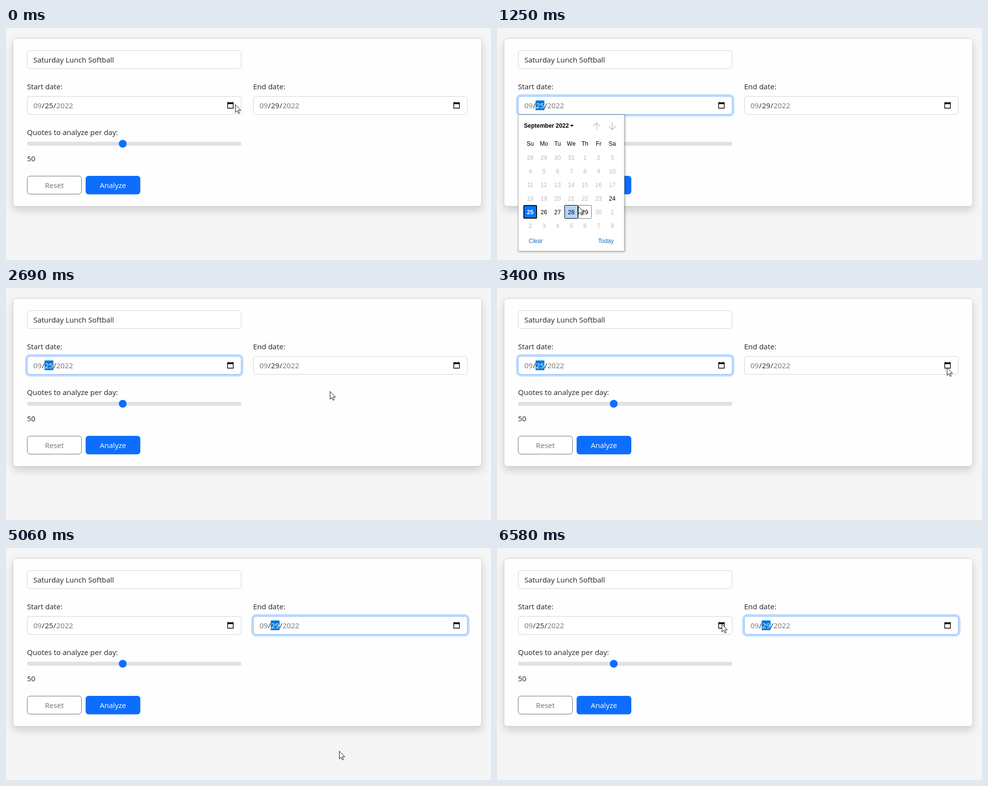
An HTML page that plays this animation: 993x477 px, repeating every 7.08 s.

```html
<!DOCTYPE html>
<html lang="en">
<head>
<meta charset="utf-8">
<title>Date form</title>
<style>
  html, body { margin: 0; width: 100%; height: 100%; overflow: hidden; background: #f5f5f5; }
  svg { display: block; font: 15px "Open Sans", "Noto Sans", sans-serif; fill: #212529; }
  .card { fill: #fefefe; stroke: #d0d0d1; filter: drop-shadow(0 8px 8px rgba(0, 0, 0, .15)); }
  .box { fill: #fff; stroke: #ced4da; }
  .ring { fill: #c2dbfe; }
  .focused { fill: #fff; stroke: #86b7fe; }
  .muted { fill: #757575; }
  .white { fill: #fff; }
  .mid { text-anchor: middle; }
  .popup { font: 12px "Liberation Sans", Arial, sans-serif; fill: #000; }
  .panel { fill: #fff; stroke: #b8b8b8; filter: drop-shadow(1px 1px 2px rgba(0, 0, 0, .35)); }
  .off { fill: #bababa; }
  .bold { font-weight: bold; }
  .link { fill: #0b72cc; }
  .arrow { fill: none; stroke: #b4b4b4; stroke-width: 1.2; }
</style>
</head>
<body>
<svg id="stage" width="993" height="477" viewBox="0 0 993 477"></svg>
<script>
const LOOP = 7080;
const START_OPEN = 110, START_PICK = 2090, END_OPEN = 3600, END_PICK = 4740;
const CELL = 28, FIRST_X = 11, FIRST_Y = 252;

// Pointer stops: time, x, y
const stops = [
  [0, 469, 157], [30, 469, 157], [250, 436, 176], [450, 310, 238], [710, 190, 292],
  [950, 101, 345], [1250, 165.6, 366], [1430, 211, 356], [1600, 160, 367],
  [1860, 64, 377], [2090, 64, 377], [2400, 340, 298], [2690, 662, 212],
  [2760, 703, 207], [3080, 985, 188], [3400, 921, 163], [3600, 921, 163],
  [3820, 909, 183], [4080, 785, 325], [4290, 691, 420], [4430, 669, 441],
  [4740, 669, 441], [5060, 682, 417], [5420, 683, 296], [5800, 570, 222],
  [6140, 476, 165], [6350, 460, 157], [6580, 460, 156], [LOOP, 460, 156]
];

const text = (x, y, s, cls = "") => `<text x="${x}" y="${y}" class="${cls}">${s}</text>`;
const rect = (x, y, w, h, r, attrs) =>
  `<rect x="${x}" y="${y}" width="${w}" height="${h}" rx="${r}" ${attrs}/>`;
const field = (x, y, cls = "box") => rect(x + .5, y + .5, 438, 37, 5.5, `class="${cls}"`);

function dateField(id, x, label, day) {
  return text(x, 126, label) + field(x, 140) +
    `<g id="${id}Focus">${rect(x - 4, 136, 447, 46, 10, 'class="ring"')}
      ${field(x, 140, "focused")}${rect(x + 36, 149, 18, 20, 0, 'fill="#0078d7"')}</g>` +
    text(x + 13, 165, "09", "muted") + text(x + 30.5, 165, "/") +
    `<text id="${id}Day" x="${x + 36.5}" y="165">${day}</text>` +
    text(x + 54, 165, "/") + text(x + 60, 165, "2022", "muted") +
    `<path d="M${x + 410.7} 154.7h11.6v10h-11.6z" fill="none" stroke="#000" stroke-width="1.4"/>
     <path d="M${x + 410} 153h13v3.5h-13zM${x + 412} 152h1.6v2h-1.6zM${x + 419.4} 152h1.6v2h-1.6z" fill="#000"/>`;
}

function popup(id, x, firstDay, picked) {
  let s = `<g id="${id}Popup" class="popup">` +
    rect(x + .5, 178.5, 217, 280, 0, 'class="panel"') +
    text(x + 12, 205, "September 2022", "bold") +
    `<path d="M${x + 106.5} 199h7.5l-3.75 4z"/>
     <path class="arrow" d="M${x + 161} 210v-15m-7 7l7-7l7 7M${x + 193} 194v15m-7-7l7 7l7-7"/>` +
    `<rect id="${id}Hover" width="27" height="27" rx="1" fill="#b2d5ff" stroke="#000"/>`;
  ["Su", "Mo", "Tu", "We", "Th", "Fr", "Sa"].forEach((d, i) => {
    s += text(x + 25 + CELL * i, 242, d, "mid");
  });
  for (let i = 0; i < 42; i++) {
    const n = i - 3; // the grid begins on August 28
    const day = n < 1 ? n + 31 : n > 30 ? n - 30 : n;
    const cx = x + FIRST_X + CELL * (i % 7), cy = FIRST_Y + CELL * Math.floor(i / 7);
    let cls = "mid";
    if (n === picked) {
      s += rect(cx + 1, cy + 1, 26, 26, 1, 'fill="#0a75ff" stroke="#101010" stroke-width="2"');
      cls += " bold white";
    } else if (n === 29) {
      s += rect(cx + .5, cy + .5, 27, 27, 1, 'fill="none" stroke="#767676"');
    }
    if (n < firstDay || n > 29) cls += " off";
    s += text(cx + 14, cy + 19, day, cls);
  }
  return s + text(x + 22, 442, "Clear", "link") + text(x + 164, 442, "Today", "link") + "</g>";
}

document.getElementById("stage").innerHTML =
  rect(14.5, 21.5, 959, 345, 6, 'class="card"') +
  field(43, 46) + text(56, 71, "Saturday Lunch Softball") +
  dateField("start", 43, "Start date:", 25) +
  dateField("end", 506, "End date:", 29) +
  text(43, 220, "Quotes to analyze per day:") +
  rect(43, 234, 439, 8, 4, 'fill="#dee2e6"') +
  '<circle cx="239" cy="238" r="8" fill="#0d6efd"/>' +
  text(43, 274, "50") +
  rect(43.5, 304.5, 111, 37, 5.5, 'fill="#fff" stroke="#6c757d"') +
  text(99, 329, "Reset", "mid muted") +
  rect(163, 304, 112, 38, 6, 'fill="#0d6efd"') +
  text(219, 329, "Analyze", "mid white") +
  popup("start", 43, 24, 25) + popup("end", 506, 25, 29) +
  `<path id="pointer" d="M.5.7v16l3.7-3.5l2.6 5.6l2.3-1l-2.5-5.5h5z"
    fill="#fff" stroke="#111" stroke-linejoin="round"/>`;

const get = id => document.getElementById(id);
const show = (id, on) => get(id).setAttribute("visibility", on ? "visible" : "hidden");

const slope = (i, k) => (stops[i + 1][k] - stops[i][k]) / (stops[i + 1][0] - stops[i][0]);

// Tangent that never overshoots a stop
function tangent(i, k) {
  if (i === 0 || i === stops.length - 1) return 0;
  const a = slope(i - 1, k), b = slope(i, k);
  return a * b <= 0 ? 0 : 2 * a * b / (a + b);
}

function pointerAt(t) {
  let i = 0;
  while (i < stops.length - 2 && t >= stops[i + 1][0]) i++;
  const d = stops[i + 1][0] - stops[i][0], u = (t - stops[i][0]) / d, v = 1 - u;
  return [1, 2].map(k =>
    v * v * (1 + 2 * u) * stops[i][k] + u * u * (3 - 2 * u) * stops[i + 1][k] +
    d * u * v * (v * tangent(i, k) - u * tangent(i + 1, k)));
}

function hover(id, left, firstDay, picked, open, x, y) {
  const col = Math.floor((x - left - FIRST_X) / CELL), row = Math.floor((y - FIRST_Y) / CELL);
  const n = row * 7 + col - 3;
  const on = open && col >= 0 && col < 7 && n >= firstDay && n <= 29 && n !== picked;
  show(id + "Hover", on);
  if (on) {
    get(id + "Hover").setAttribute("x", left + FIRST_X + col * CELL + .5);
    get(id + "Hover").setAttribute("y", FIRST_Y + row * CELL + .5);
  }
}

function focus(id, on) {
  show(id + "Focus", on);
  get(id + "Day").setAttribute("class", on ? "white" : "");
}

function draw(t) {
  const [x, y] = pointerAt(t);
  const startOpen = t >= START_OPEN && t < START_PICK;
  const endOpen = t >= END_OPEN && t < END_PICK;
  focus("start", t >= START_OPEN && t < END_OPEN);
  focus("end", t >= END_OPEN);
  show("startPopup", startOpen);
  show("endPopup", endOpen);
  hover("start", 43, 24, 25, startOpen, x, y);
  hover("end", 506, 25, 29, endOpen, x, y);
  get("pointer").setAttribute("transform", `translate(${Math.round(x)} ${Math.round(y)})`);
}

const begin = performance.now();
function tick() {
  draw((performance.now() - begin) % LOOP);
  requestAnimationFrame(tick);
}
tick();
</script>
</body>
</html>
```
